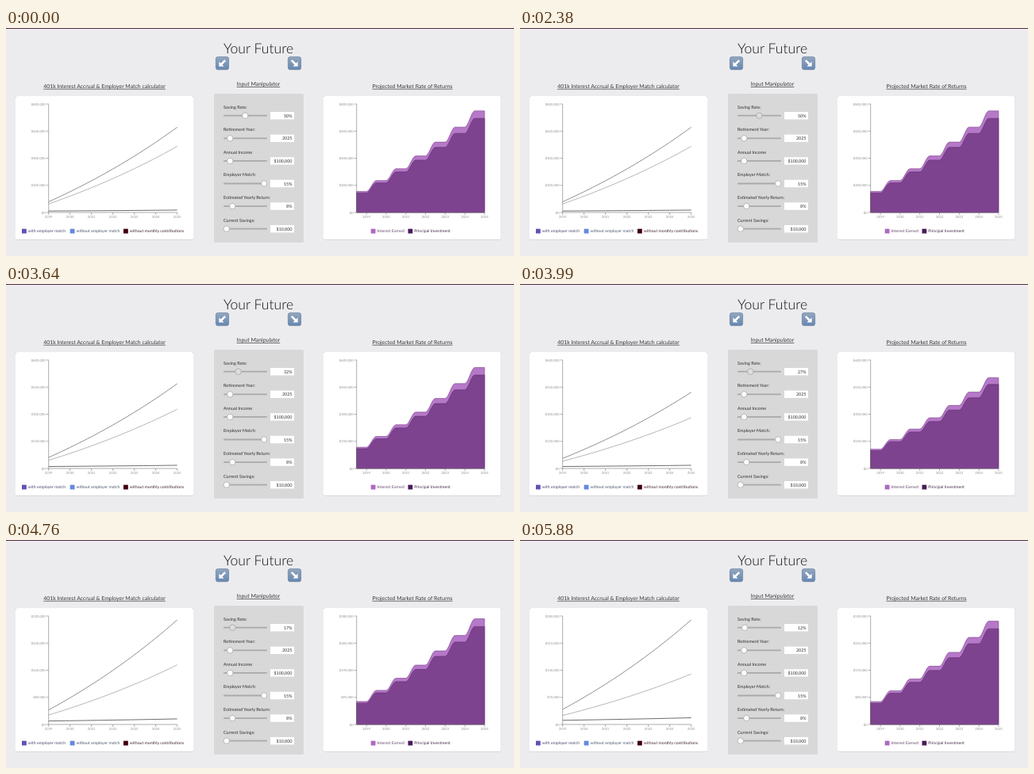
Recreate the animation shown at these times as an HTML page. Size 640x288 px, loop 5950 ms.

```html
<!DOCTYPE html>
<html lang="en">
<head>
<meta charset="utf-8">
<title>Your Future</title>
<style>
  html, body { margin: 0; width: 100%; height: 100%; overflow: hidden; background: #ececef; }
  svg { display: block; width: 640px; height: 288px; font-family: Lato, "Open Sans", sans-serif; text-rendering: geometricPrecision; }
  .title { font-size: 17.6px; font-weight: 300; fill: #111; text-anchor: middle; }
  .heading { font-size: 6.92px; fill: #383838; text-anchor: middle; text-decoration: underline; text-decoration-thickness: .5px; }
  .label { font-size: 5.5px; font-weight: 500; fill: #3c3c3c; }
  .value { font-size: 5.4px; fill: #2c2c2c; text-anchor: end; }
  .tick { font-size: 4.2px; fill: #929292; }
  .legend { font-size: 5.13px; }
  .axis { stroke: #777; stroke-width: .6; fill: none; }
  .card { fill: #fff; filter: drop-shadow(.9px .9px .4px rgba(0, 0, 0, .55)); }
</style>
</head>
<body>
<svg id="stage" viewBox="0 0 640 288">
  <defs>
    <linearGradient id="button" x2="0" y2="1">
      <stop offset="0" stop-color="#93a7bf"/>
      <stop offset="1" stop-color="#6687b0"/>
    </linearGradient>
  </defs>
</svg>
<script>
const LOOP = 5950, FRAME = 70;
const TOP = 96, BASE = 233, HEIGHT = BASE - TOP;
const INCOME = 100000, SAVINGS = 10000, MATCH = 15, RETURN = 0.08;
const stage = document.getElementById('stage');

function add(tag, attrs, text, parent = stage) {
  const el = document.createElementNS('http://www.w3.org/2000/svg', tag);
  for (const key in attrs) el.setAttribute(key, attrs[key]);
  if (text !== undefined) el.textContent = text;
  parent.appendChild(el);
  return el;
}
const rect = (x, y, width, height, attrs) => add('rect', { x, y, width, height, ...attrs });
const label = (x, y, text, cls, attrs) => add('text', { x, y, class: cls, ...attrs }, text);

// --- Page furniture ---
rect(0, 0, 640, 288, { fill: '#ececef' });
rect(0, 0, 640, 1, { fill: '#4f2a38' });
label(318, 31.6, 'Your Future', 'title');

function arrowButton(x, flip) {
  const g = add('g', { transform: `translate(${x} 36)` + (flip ? ' translate(17 0) scale(-1 1)' : '') });
  add('rect', { x: .4, y: .4, width: 16.2, height: 16.2, rx: 2.6, fill: 'url(#button)', stroke: '#6f86a3', 'stroke-width': .8 }, undefined, g);
  add('path', { d: 'M4.4 12.6V6.4L10.6 12.6Z', fill: '#fff' }, undefined, g);
  add('path', { d: 'M7 10L12.2 4.8', stroke: '#fff', 'stroke-width': 2.6 }, undefined, g);
}
arrowButton(264, false);
arrowButton(355, true);

label(124, 75.8, '401k Interest Accrual & Employer Match calculator', 'heading');
label(318, 73.2, 'Input Manipulator', 'heading');
label(512, 75.8, 'Projected Market Rate of Returns', 'heading');
rect(12, 86, 224, 181.3, { class: 'card', rx: 1.5 });
rect(400, 86, 223.8, 181.3, { class: 'card', rx: 1.5 });
rect(262, 83, 113, 188, { fill: '#d8d8d8', rx: 1 });

// --- Inputs ---
const controls = [
  ['Saving Rate:', '50%', 301.2],
  ['Retirement Year:', '2025', 282.3],
  ['Annual Income', '$100,000', 282.3],
  ['Employer Match:', '15%', 325.2],
  ['Estimated Yearly Return:', '8%', 285.3],
  ['Current Savings:', '$10,000', 277.8]
].map(([name, value, x], i) => {
  const y = 110.7 + i * 28.6;
  label(274, y - 9.2, name, 'label');
  rect(274, y - .9, 55, 1.8, { rx: .9, fill: '#a9a9a9' });
  const thumb = add('circle', { cx: x, cy: y, r: 3.7, fill: '#fbfbfb', stroke: '#969696', 'stroke-width': .6 });
  rect(333, y - 4.7, 30, 9.4, { fill: '#fff' });
  return { thumb, value: label(360.5, y + 2, value, 'value') };
});
const saving = controls[0];

// --- Charts ---
function chart(x, firstTick, gap, width) {
  const plot = add('g', {});
  add('path', { class: 'axis', d: `M${x} ${TOP}V${BASE}H${x + width}` });
  for (let i = 0; i < 7; i++) {
    const tx = firstTick + i * gap;
    add('path', { class: 'axis', d: `M${tx} ${BASE}v3` });
    label(tx, 239.6, 2019 + i, 'tick', { 'text-anchor': 'middle' });
  }
  const ticks = [0, 1, 2, 3, 4].map(i => {
    const y = BASE - HEIGHT * i / 4;
    add('path', { class: 'axis', d: `M${x} ${y}h-3` });
    return label(x - 4, y + 1.6, '', 'tick', { 'text-anchor': 'end' });
  });
  return { x, width, plot, ticks };
}
const growth = chart(53.7, 53.7, 27, 162);
const market = chart(441.7, 454.1, 161.2 / 13 * 2, 161.2);

const shape = (plot, fill, stroke, width) =>
  add('path', { fill, stroke, 'stroke-width': width }, undefined, plot);
const lines = ['#606066', '#97979b', '#2c2c2c'].map(c => shape(growth.plot, 'none', c, .7));
const areas = [['#b678c8', '#7a408c'], ['#7e438f', '#5a2a6b']].map(([f, s]) => shape(market.plot, f, s, .6));

[
  [20, '#6250b4', 'with employer match', '#4c4570'],
  [80.7, '#6488e2', 'without employer match', '#4d5670'],
  [148, '#40000c', 'without monthly contributions', '#40262c'],
  [459.7, '#ae68c2', 'Interest Earned', '#654a6e'],
  [506.5, '#4a1a5e', 'Principal Investment', '#432a4e']
].forEach(([x, color, text, ink]) => {
  rect(x, 253.7, 5.8, 5.8, { fill: color });
  label(x + 7.7, 258.4, text, 'legend', { fill: ink });
});

// --- Savings model: monthly deposits, monthly compounding ---
function balance(percent, years) {
  const m = RETURN / 12, f = (1 + m) ** (12 * years);
  return SAVINGS * f + INCOME * percent / 100 * (f - 1) / RETURN * (1 + m);
}

// Rounded axis step that fits the peak into four intervals
function axisStep(peak) {
  const rough = peak / 4, unit = 10 ** (Math.floor(Math.log10(rough)) + 1) / 20;
  return Math.ceil(rough / unit) * unit;
}

const SAMPLES = 30;
function geometry(rate) {
  const full = rate + MATCH, deposit = INCOME * full / 100;
  const leftStep = axisStep(balance(full, 7));
  const invested = [1, 2, 3, 4, 5, 6, 7].map(n => balance(full, n) + deposit);
  const earned = invested.map(v => v * (1 + RETURN));
  const rightStep = axisStep(earned[6]);
  const toY = (v, step) => BASE - HEIGHT * v / (4 * step);
  const curves = [full, rate, 0].map(p =>
    Array.from({ length: SAMPLES + 1 }, (_, i) => toY(balance(p, 1 + 6 * i / SAMPLES), leftStep)));
  const levels = [earned, invested].map(a => a.map(v => toY(v, rightStep)));
  return { leftStep, rightStep, curves, levels };
}

const linePath = ys => 'M' + ys.map((y, i) =>
  `${(growth.x + growth.width * i / SAMPLES).toFixed(2)} ${y.toFixed(2)}`).join('L');

function terracePath(ys) {
  const w = market.width / 13;
  let x = market.x, d = `M${x} ${BASE}V${ys[0]}`;
  ys.forEach((y, i) => {
    if (i) {
      d += `C${x + w / 3} ${ys[i - 1]} ${x + w * 2 / 3} ${y} ${x + w} ${y}`;
      x += w;
    }
    x += w;
    d += `H${x}`;
  });
  return d + `V${BASE}Z`;
}

// --- Motion: the slider drag, one change per whole percent ---
const drag = [[2400, 50], [2940, 39], [3640, 32], [4340, 22], [4760, 17], [5040, 12]];
const changes = [{ time: -9999, rate: 50 }];
for (let i = 1; i < drag.length; i++) {
  const [t0, r0] = drag[i - 1], [t1, r1] = drag[i];
  for (let rate = r0 - 1; rate >= r1; rate--)
    changes.push({ time: t0 + (t1 - t0) * (r0 - rate) / (r0 - r1), rate });
}

// cubic-bezier(.25, .1, .25, 1)
function ease(p) {
  if (p >= 1) return 1;
  const bez = (a, b, u) => 3 * a * u * (1 - u) ** 2 + 3 * b * u * u * (1 - u) + u ** 3;
  let lo = 0, hi = 1;
  for (let i = 0; i < 20; i++) {
    const mid = (lo + hi) / 2;
    if (bez(.25, .25, mid) < p) lo = mid; else hi = mid;
  }
  return bez(.1, 1, lo);
}

function setTicks(ticks, step) {
  ticks.forEach((el, i) => { el.textContent = '$' + Math.round(step * i).toLocaleString('en-US'); });
}

function draw(t) {
  let k = 0;
  while (k + 1 < changes.length && changes[k + 1].time <= t + .01) k++;
  const { time, rate } = changes[k];
  const now = geometry(rate), before = geometry(changes[Math.max(0, k - 1)].rate);
  const p = ease(Math.max(0, t - time) / 1500);
  const blend = (a, b) => a.map((v, i) => v + (b[i] - v) * p);

  lines.forEach((el, i) => el.setAttribute('d', linePath(blend(before.curves[i], now.curves[i]))));
  areas.forEach((el, i) => el.setAttribute('d', terracePath(blend(before.levels[i], now.levels[i]))));
  setTicks(growth.ticks, now.leftStep);
  setTicks(market.ticks, now.rightStep);
  saving.value.textContent = rate + '%';
  saving.thumb.setAttribute('cx', 277.3 + .48 * rate);
  saving.thumb.setAttribute('fill', t >= 2100 && t < 5460 ? '#dedede' : '#fbfbfb');
}

const start = performance.now();
function tick() {
  const t = (performance.now() - start) % LOOP;
  draw(Math.floor(t / FRAME) * FRAME);
  requestAnimationFrame(tick);
}
tick();
</script>
</body>
</html>
```
